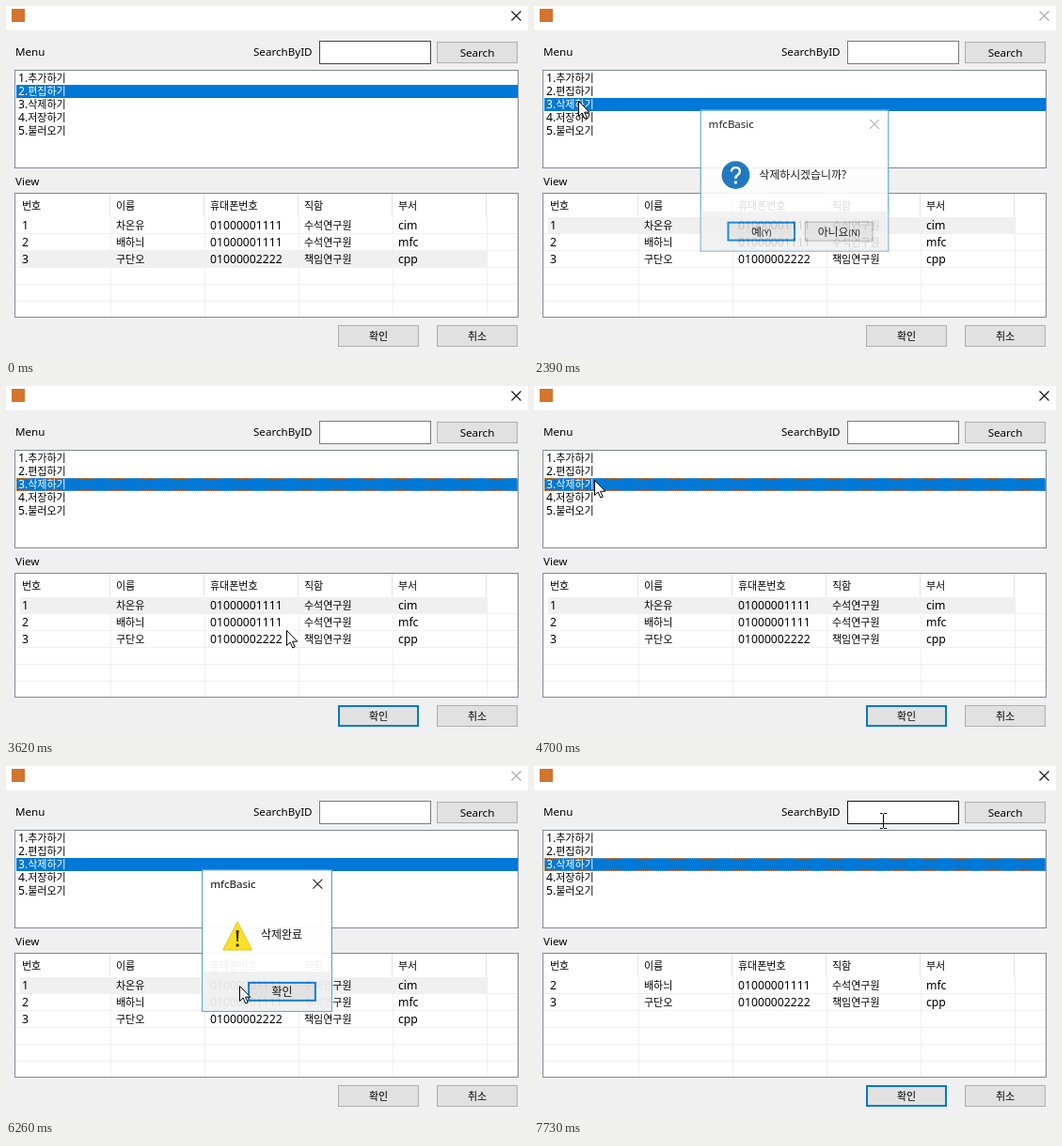
These frames come from a looping animation (555x375 px, 8 s). An HTML page:

```html
<!DOCTYPE html>
<html lang="ko">
<head>
<meta charset="utf-8">
<title>mfcBasic</title>
<style>
html, body { margin: 0; width: 100%; height: 100%; overflow: hidden; }
#app {
  position: absolute; left: 0; top: 0; width: 555px; height: 375px; overflow: hidden;
  background: #f0f0f0; color: #000;
  font: 11px/18px "Noto Sans", "Noto Sans CJK KR", sans-serif;
}
#app div, #app svg { position: absolute; box-sizing: border-box; white-space: nowrap; }
.bar { left: 0; top: 0; width: 555px; height: 26px; background: #fff; }
.logo { left: 6px; top: 3px; width: 14px; height: 14px; background: #d5742c; }
.label { font-size: 11.6px; }
.num { font-size: 12.2px; }
b { font-weight: 400; font-size: 12.2px; }
small { font-size: 9px; }
.box { left: 9px; width: 536px; background: #fff; border: 1px solid #828790; }
#edit { left: 333px; top: 37px; width: 119px; height: 25px; background: #fff; border: 1px solid #7a7a7a; }
.btn { background: #e1e1e1; border: 1px solid #adadad; text-align: center; }
.btn.def { border: 2px solid #0078d7; }
.btn.hot { background: #e5f1fb; border-color: #0078d7; }
.item { left: 11px; width: 533px; height: 14px; line-height: 14px; padding-left: 2px; }
.row { left: 15px; width: 496px; height: 18px; }
.on { background: #0078d7; color: #fff; }
.dim { background: #f0f0f0; }
.focus { outline: 1px dotted #ff8728; outline-offset: -1px; }
.line { background: #f0f0f0; }
.head { background: #e2e2e2; }
.dlg { top: 110px; height: 152px; background: #fff; border: 1px solid #2b87cc; font-size: 12px; }
.foot { left: 0; right: 0; bottom: 0; height: 42px; background: #f0f0f0; }
.x { fill: none; stroke: #111; stroke-width: 1.1; }
.x.off { stroke: #a8a8a8; }
</style>
</head>
<body>
<div id="app"></div>
<script>
const LOOP = 8000, STEP = 76.7;
const app = document.getElementById('app');

function add(html, parent = app) {
  parent.insertAdjacentHTML('beforeend', html);
  return parent.lastElementChild;
}
const rect = (cls, x, y, w, h, parent, text = '') =>
  add(`<div class="${cls}" style="left:${x}px;top:${y}px;width:${w}px;height:${h}px">${text}</div>`, parent);
// text placed by its left edge and vertical centre
const text = (s, x, cy, cls = '', parent = app) =>
  add(`<div class="${cls}" style="left:${x}px;top:${cy - 9}px">${s}</div>`, parent);
function button(s, x, y, w, h, parent = app, cls = '') {
  const el = rect('btn ' + cls, x, y, w, h, parent);
  const inset = cls.includes('def') ? 4 : 2;
  el.innerHTML = s;
  el.style.lineHeight = h - inset + 'px';
  return el;
}
const cross = (x, y, parent, cls = '') =>
  add(`<svg class="x ${cls}" style="left:${x}px;top:${y}px" width="11" height="11"><path d="M.5 .5 10.5 10.5M10.5 .5 .5 10.5"/></svg>`, parent);

// main window
add('<div class="bar"></div>');
add('<div class="logo"></div>');
const mainX = cross(537, 5, app);
text('Menu', 10, 49, 'label');
text('SearchByID', 263, 49, 'label');
text('View', 10, 187, 'label');
const edit = add('<div id="edit"></div>');
button('Search', 458, 38, 86, 23, app, 'label');
const ok = button('확인', 353, 340, 86, 23);
button('취소', 458, 340, 86, 23);

add('<div class="box" style="top:68px;height:105px"></div>');
const items = ['추가하기', '편집하기', '삭제하기', '저장하기', '불러오기'].map((s, i) =>
  add(`<div class="item" style="top:${70 + 14 * i}px"><b>${i + 1}.</b>${s}</div>`));

add('<div class="box" style="top:199px;height:133px"></div>');
const cols = [17, 117, 217, 317, 417];
['번호', '이름', '휴대폰번호', '직함', '부서'].forEach((s, i) => {
  text(s, cols[i], 213);
  rect('head', 110 + 100 * i, 200, 1, 24, app);
  rect('line', 111 + 100 * i, 224, 1, 107, app);
});
for (let y = 242; y < 331; y += 18) rect('line', 10, y, 534, 1, app);
const rows = [
  ['1', '차온유', '01000001111', '수석연구원', 'cim'],
  ['2', '배하늬', '01000001111', '수석연구원', 'mfc'],
  ['3', '구단오', '01000002222', '책임연구원', 'cpp']
].map(cells => {
  const row = add('<div class="row"></div>');
  cells.forEach((s, i) => text(s, cols[i] - 15, 9, /\w/.test(s) ? 'num' : '', row));
  return row;
});

// message boxes
function dialog(x, w, mark, message, msgX, closable) {
  const el = add(`<div class="dlg" style="left:${x}px;width:${w}px"><div class="foot"></div></div>`);
  text('mfcBasic', 8, 15, 'label', el);
  cross(w - 22, 9, el, closable ? '' : 'off');
  add(mark, el);
  text(message, msgX, 69, '', el);
  return el;
}
const ask = dialog(176, 202,
  `<svg style="left:21px;top:53px" width="32" height="32"><circle cx="16" cy="16" r="15" fill="#0067b9"/>
   <path d="M11.5 12.5Q11.5 8 16 8t4.5 4.2Q20.500 14.500 18 16.200T16 20" fill="none" stroke="#fff" stroke-width="2.400"/>
   <circle cx="16" cy="24" r="1.700" fill="#fff"/></svg>`,
  '삭제하시겠습니까?', 62, false);
const yes = button('예<small>(Y)</small>', 28, 119, 73, 21, ask, 'def');
const no = button('아니요<small>(N)</small>', 111, 119, 73, 21, ask);

const done = dialog(208, 139,
  `<svg style="left:20px;top:53px" width="34" height="34"><path d="M17 2 32.500 32H1.500Z" fill="#ffe11a" stroke="#e3c400"/>
   <path d="M15.500 11h3l-.7 12h-1.600Z" fill="#222"/><circle cx="17" cy="27" r="1.700" fill="#222"/></svg>`,
  '삭제완료', 62, true);
const doneOk = button('확인', 48, 119, 73, 21, done, 'def');

// pointers, both drawn from their hot spot
const arrow = add(`<svg width="13" height="21"><path d="M.5 .5V16.500L4.200 13 6.800 19 9.200 18 6.600 12.200H11.800Z" fill="#fff" stroke="#000"/></svg>`);
const beam = add(`<svg width="9" height="17"><path d="M1 .5H3.500L4.500 1.500 5.500 .5H8M4.500 1.500V15.500M1 16.500H3.500L4.500 15.500 5.500 16.500H8" fill="none" stroke="#000"/></svg>`);

// time, x, y
const path = [
  [300, 393, 347], [690, 281, 232], [840, 281, 232], [1600, 75, 64],
  [1620, 75, 64], [1830, 47, 101], [2400, 47, 101], [3000, 300, 238],
  [3450, 300, 240], [3590, 298, 260], [3680, 298, 260], [3980, 269, 228],
  [4250, 269, 228], [4670, 64, 100], [4800, 64, 100], [4900, 52, 98],
  [5110, 52, 98], [5280, 109, 115], [5300, 109, 115], [5820, 240, 236],
  [5960, 240, 236], [6190, 248, 234], [6230, 248, 234], [6460, 301, 233],
  [7040, 301, 233], [7290, 367, 71], [7420, 367, 71], [7640, 371, 58]
];
const clamp = v => Math.max(0, Math.min(1, v));

function pointer(t) {
  const i = path.findIndex(p => p[0] > t);
  if (i < 0) return path[path.length - 1].slice(1);
  if (i === 0) return null;
  const [t0, x0, y0] = path[i - 1], [t1, x1, y1] = path[i];
  const p = (t - t0) / (t1 - t0), e = p * p * (3 - 2 * p);
  return [Math.round(x0 + (x1 - x0) * e), Math.round(y0 + (y1 - y0) * e)];
}

function fade(el, t, spans) {
  const span = spans.find(s => t >= s[0] && t < s[1] + 150);
  el.style.visibility = span ? 'visible' : 'hidden';
  if (!span) return false;
  const rise = 1 - (1 - clamp((t - span[0]) / 170)) ** 3;
  const alpha = rise * (1 - clamp((t - span[1]) / 150));
  el.style.opacity = alpha;
  el.style.transform = `scale(${0.95 + 0.05 * alpha})`;
  return t < span[1];
}

function hover(btn, dlg, pos) {
  const x = dlg.offsetLeft + 1 + btn.offsetLeft, y = dlg.offsetTop + 1 + btn.offsetTop;
  btn.classList.toggle('hot', !!pos && pos[0] >= x && pos[0] < x + 73 && pos[1] >= y && pos[1] < y + 21);
}

function draw(t) {
  const asking = fade(ask, t, [[2295, 3450], [5105, 5950]]);
  const telling = fade(done, t, [[6110, 6560]]);
  const active = !asking && !telling && !(t > 5940 && t < 6120);

  mainX.classList.toggle('off', !active);
  ok.classList.toggle('def', active && t >= 840);
  ok.style.lineHeight = ok.classList.contains('def') ? '19px' : '21px';

  const chosen = t < 1985 ? 1 : 2;
  items.forEach((el, i) => {
    el.classList.toggle('on', i === chosen);
    el.classList.toggle('focus', i === chosen && chosen === 2 && active);
  });

  const cut = t >= 6620, listFocus = t >= 840 && t < 2060;
  const picked = t < 840 ? 2 : 0;
  rows.forEach((el, i) => {
    el.style.top = 225 + 18 * (cut ? i - 1 : i) + 'px';
    el.style.visibility = cut && i === 0 ? 'hidden' : 'visible';
    el.classList.toggle('on', i === picked && listFocus);
    el.classList.toggle('focus', i === picked && listFocus);
    el.classList.toggle('dim', i === picked && !listFocus);
  });

  const dark = t < 70 ? 0.55 : clamp((t - 7480) / 150);
  const g = Math.round(122 - 99 * dark);
  edit.style.borderColor = `rgb(${g},${g},${g})`;

  const pos = pointer(t), typing = t > 7560;
  arrow.style.display = pos && !typing ? '' : 'none';
  beam.style.display = typing ? '' : 'none';
  if (pos) {
    arrow.style.left = pos[0] + 'px';
    arrow.style.top = pos[1] + 'px';
    beam.style.left = pos[0] - 4 + 'px';
    beam.style.top = pos[1] - 8 + 'px';
  }
  hover(yes, ask, pos);
  hover(no, ask, pos);
  hover(doneOk, done, pos);
}

const start = performance.now();
function tick() {
  const t = (performance.now() - start) % LOOP;
  draw(t < 76 ? t : Math.floor((t + 8) / STEP) * STEP);
  requestAnimationFrame(tick);
}
tick();
</script>
</body>
</html>
```
